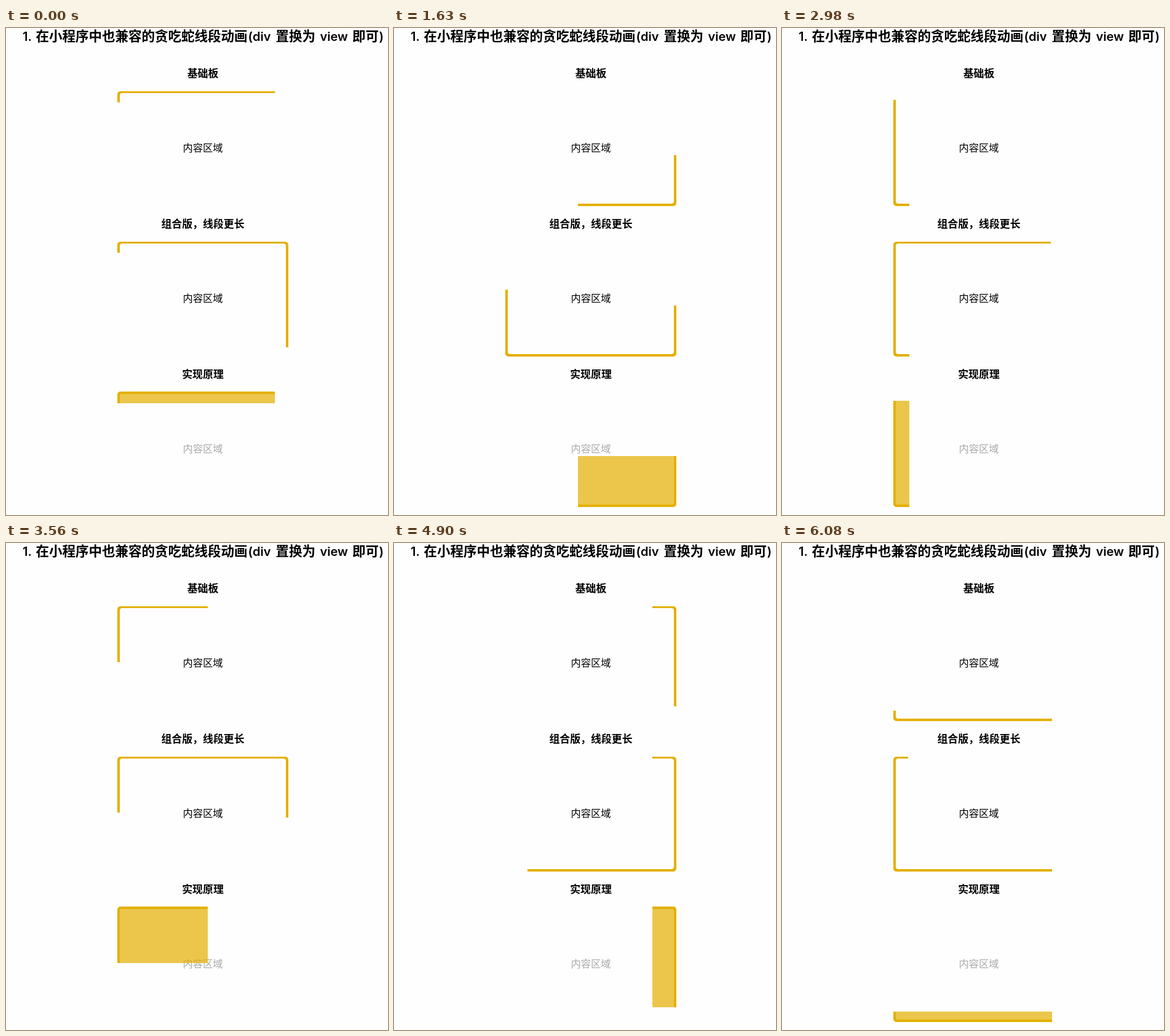
Animation of 621 by 793 pixels, one loop 6.18 s. Source, as an HTML page:

```html
<!DOCTYPE html>
<html lang="zh-CN">
<head>
<meta charset="utf-8">
<title>贪吃蛇线段动画</title>
<style>
  html, body { margin: 0; width: 100%; height: 100%; overflow: hidden; background: #fefefe; }
  svg { position: absolute; left: 0; top: 0; }
  text { font-family: Inter, "Noto Sans CJK SC", "Noto Sans CJK", sans-serif; white-space: pre; }
  .title { font-size: 21.5px; font-weight: 700; }
  .latin { font-size: 20px; font-weight: 600; }
  .head { font-size: 16.9px; font-weight: 700; text-anchor: middle; }
  .body { font-size: 16.3px; text-anchor: middle; }
  .pale { fill: #aaa; }
  .line { position: absolute; overflow: hidden; border-radius: 5px; }
  .line::before {
    content: ""; position: absolute; inset: 3px 4px 4px;
    border-radius: 4px; box-shadow: 0 0 0 10px #e4b001;
  }
  .filled::before { top: 4px; background: rgba(228, 176, 1, .7); }
</style>
</head>
<body>
<svg width="621" height="793">
  <text class="title" y="20.5"><tspan class="latin" x="27">1.</tspan><tspan x="48.5">在小程序中也兼容的贪吃蛇线段动画</tspan><tspan class="latin" x="393.5">(div</tspan><tspan x="438.5">置换为</tspan><tspan class="latin" x="510.5">view</tspan><tspan x="563">即可</tspan><tspan class="latin" x="606.5">)</tspan></text>
  <text class="head" x="320" y="80.3">基础板</text>
  <text class="body" x="320" y="201">内容区域</text>
  <text class="head" x="320" y="325.3">组合版，线段更长</text>
  <text class="body" x="320" y="446">内容区域</text>
  <text class="head" x="320" y="570.3">实现原理</text>
  <text class="body pale" x="320" y="691">内容区域</text>
</svg>
<div class="line" data-row="0" data-lead="0"></div>
<div class="line" data-row="1" data-lead="0"></div>
<div class="line" data-row="1" data-lead="1"></div>
<div class="line filled" data-row="2" data-lead="0"></div>
<script>
  const LOOP = 6180, STEPS = 42, START = 0.921, TURN = 0.15;
  const LEFT = 181.3, TOP = 102.7, WIDTH = 277.3, HEIGHT = 187.1, PITCH = 244.85, EDGE = 3.8;

  // Start time of every step: 150 ms each, a few last 140 ms.
  const brief = new Set([4, 10, 20, 23, 30, 36, 39]);
  const starts = [0];
  for (let k = 1; k < STEPS; k++) starts.push(starts[k - 1] + (brief.has(k - 1) ? 140 : 150));

  // Pixel-snapped edges of a row's box after cutting each side.
  function edges(row, top = 0, right = 0, bottom = 0, left = 0) {
    const y = TOP + row * PITCH, w = WIDTH - EDGE, h = HEIGHT - EDGE;
    return [y + top * h, LEFT + WIDTH - right * w, y + HEIGHT - bottom * h, LEFT + left * w].map(Math.round);
  }

  const lines = [...document.querySelectorAll('.line')].map(el => {
    const row = +el.dataset.row, box = edges(row);
    const [top, right, bottom, left] = box;
    Object.assign(el.style, {
      left: left + 'px', top: top + 'px', width: right - left + 'px', height: bottom - top + 'px'
    });
    return { el, row, box, lead: +el.dataset.lead };
  });

  // Phases 0 to 3 leave only the left, top, right and bottom edge.
  function cuts(phase) {
    return [3, 0, 1, 2].map(peak => {
      const d = Math.abs(phase - peak) % 4;
      return Math.max(0, 1 - Math.min(d, 4 - d));
    });
  }

  function draw(now) {
    const t = now % LOOP;
    let k = STEPS - 1;
    while (starts[k] > t) k--;
    for (const { el, row, box, lead } of lines) {
      const cut = edges(row, ...cuts(START + TURN * k + lead));
      el.style.clipPath = `inset(${cut.map((v, i) => Math.abs(v - box[i]) + 'px').join(' ')})`;
    }
  }

  const origin = performance.now();
  function tick() {
    draw(performance.now() - origin);
    requestAnimationFrame(tick);
  }
  tick();
</script>
</body>
</html>
```
